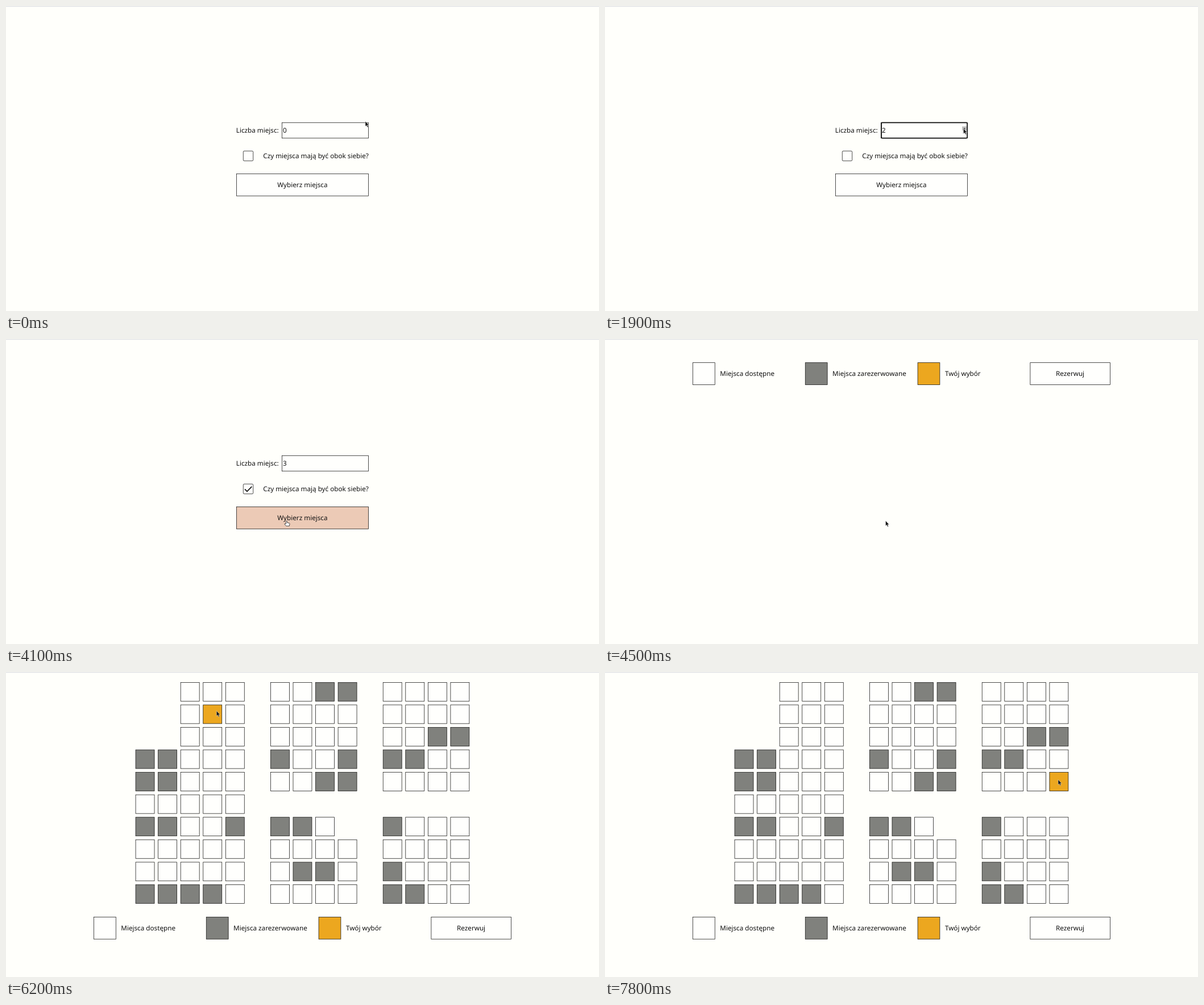
Write an HTML page that moves like this. It is 1043 px wide and 537 px high and loops after 8000 ms.

```html
<!DOCTYPE html>
<html lang="pl">
<head>
<meta charset="utf-8">
<title>Wybór miejsc</title>
<style>
  html, body { margin: 0; width: 100%; height: 100%; overflow: hidden; background: #fffffb; }
  svg { display: block; width: 100vw; height: 100vh; }
  text { font: 11.7px "Noto Sans", "Open Sans", sans-serif; fill: #111; text-rendering: geometricPrecision; }
  .mid { text-anchor: middle; }
  .box { fill: #fffffd; stroke: #111; stroke-width: .75; }
  .popup text { font: 6.5px Roboto, Inter, sans-serif; fill: #666; }
  .popup .brand { font-weight: 500; fill: #555; }
</style>
</head>
<body>
<svg viewBox="0 0 1043 537" xmlns="http://www.w3.org/2000/svg">
  <defs>
    <filter id="shadow" x="-10%" y="-30%" width="120%" height="160%">
      <feDropShadow dx="0" dy="1" stdDeviation="1.4" flood-opacity=".4"/>
    </filter>
  </defs>
  <rect width="1043" height="537" fill="#fffffb"/>
  <rect width="1043" height="1.3" fill="#e1e2e4"/>

  <g id="popup" class="popup">
    <rect x="791" y="-20" width="191" height="53.5" rx="2" fill="#fff" filter="url(#shadow)"/>
    <path d="M791 7H982V31.5a2 2 0 0 1-2 2H793a2 2 0 0 1-2-2Z" fill="#f5f7f7"/>
    <path d="M791 7.5H982" stroke="#e6e8e8"/>
    <path d="M852 1.5H898" stroke="#e4e4e4"/>
    <path d="M800 1.2H852" stroke="#4a5fb8" stroke-width="1.5"/>
    <text class="brand" x="800" y="22.6">Vumelo</text>
    <text x="824.3" y="22.6">Translate</text>
  </g>

  <g id="form">
    <text x="404.8" y="222.7">Liczba miejsc:</text>
    <rect id="field" class="box" x="485.5" y="205.3" width="152.1" height="27.4"/>
    <rect id="focus" x="486.1" y="205.4" width="151" height="27.2" rx="1.5" fill="none" stroke="#111" stroke-width="1.7"/>
    <text id="count" x="487" y="222.7"></text>
    <g id="spinner">
      <rect x="628" y="212" width="8" height="13" fill="#efefef"/>
      <rect id="spinUp" x="628" y="212" width="8" height="7" fill="#c1c1c1"/>
      <path d="M629.8 216.8L632 214.3L634.2 216.8ZM629.8 220.3L632 222.8L634.2 220.3Z" fill="#444"/>
    </g>
    <rect class="box" x="417.3" y="255.3" width="17.4" height="17.4" rx="1.8"/>
    <path id="check" d="M420 264.3L424 268.3L432.3 259.8" fill="none" stroke="#111" stroke-width="1.7"/>
    <text x="452.3" y="268">Czy miejsca mają być obok siebie?</text>
    <rect id="submit" class="box" x="405.4" y="295.4" width="232.2" height="38.9"/>
    <text class="mid" x="521.4" y="318.7">Wybierz miejsca</text>
  </g>

  <g id="seats"></g>
  <g id="legend"></g>

  <g id="cursor">
    <path id="arrow" d="M0 0V9L2 7.2L3.5 10.5L5 9.8L3.6 6.7H6.3Z" fill="#111" stroke="#eee" stroke-width=".5"/>
    <path id="beam" d="M-1.8 -4.8H1.8M0 -4.8V4.8M-1.8 4.8H1.8" fill="none" stroke="#222"/>
    <path id="hand" d="M-1 5.6V.9Q0 -.4 1 .9V3.4L4.8 4.2Q5.6 4.5 5.5 5.6L4.8 9.2H-.8L-3.6 6Q-3.6 4.6 -2.4 5Z" fill="#fff" stroke="#222" stroke-width=".8"/>
  </g>
</svg>
<script>
const LOOP = 8000, STEP = 100;
const FREE = '#fffffd', TAKEN = '#80817d', CHOSEN = '#eca71f';
const GRID = { x: 227.7, y: 18, pitch: 39.56, size: 33.7 };
const INSET = 0.37; // half a border
const BLUR = 3200, CHECK = 3400, SUBMIT = 4500, LOADED = 4900;
const UP_CLICKS = [1200, 1800, 2300];

const PLAN = [
  '..ooo.ooxx.oooo',
  '..ooo.oooo.oooo',
  '..ooo.oooo.ooxx',
  'xxooo.xoox.xxoo',
  'xxooo.ooxx.oooo',
  'ooooo..........',
  'xxoox.xxo..xooo',
  'ooooo.oooo.oooo',
  'ooooo.oxxo.xooo',
  'xxxxo.oooo.xxoo'
];

// the pointer rests between moves
const START = { x: 632, y: 203 };
const MOVES = [
  { from: 0, to: 100, x: 632, y: 206 },
  { from: 200, to: 400, x: 621, y: 215 },
  { from: 500, to: 900, x: 630.5, y: 215.8 },
  { from: 2300, to: 2800, x: 485, y: 279 },
  { from: 2800, to: 3100, x: 429.5, y: 264 },
  { from: 3600, to: 4100, x: 493.5, y: 320 },
  { from: 5100, to: 5400, x: 397, y: 134.5 },
  { from: 5500, to: 5700, x: 366, y: 53 },
  { from: 6000, to: 6200, x: 370.3, y: 68.5 },
  { from: 6200, to: 6800, x: 518, y: 120 },
  { from: 7300, to: 7600, x: 783, y: 190 },
  { from: 7700, to: 7800, x: 797, y: 189.5 }
];

const $ = id => document.getElementById(id);
const show = (id, on) => $(id).setAttribute('visibility', on ? 'inherit' : 'hidden');
const within = (p, x, y, w, h) => p.x >= x && p.x < x + w && p.y >= y && p.y < y + h;
const over = (p, id) => {
  const b = $(id).getBBox();
  return within(p, b.x, b.y, b.width, b.height);
};

function add(parent, tag, attrs, content = '') {
  const el = document.createElementNS('http://www.w3.org/2000/svg', tag);
  Object.entries(attrs).forEach(([k, v]) => el.setAttribute(k, v));
  el.textContent = content;
  $(parent).append(el);
  return el;
}

const addBox = (parent, x, y, w, h, fill) => add(parent, 'rect', {
  class: 'box', x: x + INSET, y: y + INSET,
  width: w - 2 * INSET, height: h - 2 * INSET, style: `fill:${fill}`
});

const seats = PLAN.flatMap((line, row) => [...line].flatMap((mark, col) => {
  if (mark === '.') return [];
  const x = GRID.x + GRID.pitch * col, y = GRID.y + GRID.pitch * row;
  const base = mark === 'x' ? TAKEN : FREE;
  return [{ row, col, x, y, base, el: addBox('seats', x, y, GRID.size, GRID.size, base) }];
}));

const planHeight = GRID.pitch * (PLAN.length - 1) + GRID.size;
const legendX = i => 154.1 + GRID.pitch * 5 * i;
const legendY = GRID.y + planHeight + 23.3;
[['Miejsca dostępne', FREE], ['Miejsca zarezerwowane', TAKEN], ['Twój wybór', CHOSEN]]
  .forEach(([label, fill], i) => {
    addBox('legend', legendX(i), legendY, GRID.pitch, GRID.pitch, fill);
    add('legend', 'text', { x: legendX(i) + 48.2, y: legendY + 24 }, label);
  });
addBox('legend', legendX(3), legendY, 141.3, GRID.pitch, FREE);
add('legend', 'text', { class: 'mid', x: legendX(3) + 70.6, y: legendY + 24 }, 'Rezerwuj');

function pointerAt(t) {
  return MOVES.reduce((p, m) => {
    const k = Math.min(1, Math.max(0, (t - m.from) / (m.to - m.from)));
    return { x: p.x + (m.x - p.x) * k, y: p.y + (m.y - p.y) * k };
  }, START);
}

function renderForm(t, p) {
  const onField = over(p, 'field');
  const onSpinner = within(p, 628, 212, 9, 13);
  const onSubmit = over(p, 'submit');
  const focused = t >= UP_CLICKS[0] && t < BLUR;
  show('focus', focused);
  show('spinner', onField || focused);
  show('spinUp', onSpinner && p.y < 219);
  show('check', t >= CHECK);
  $('count').textContent = UP_CLICKS.filter(click => click <= t).length;
  $('submit').style.fill = onSubmit ? '#eccab6' : FREE;
  if (onSubmit || within(p, 417, 255, 18, 18)) return 'hand';
  return onField && !onSpinner ? 'beam' : 'arrow';
}

function renderPlan(t, p) {
  const loaded = t >= LOADED;
  show('seats', loaded);
  $('legend').setAttribute('transform', `translate(0 ${loaded ? 0 : -planHeight})`);
  const hovered = seats.find(s => within(p, s.x, s.y, GRID.size, GRID.size));
  const reach = t >= 7000 && t < 7400 ? 1 : 0; // neighbours join the choice
  for (const s of seats) {
    const chosen = hovered && s.base === FREE && s.row === hovered.row
      && Math.abs(s.col - hovered.col) <= reach;
    s.el.style.fill = chosen ? CHOSEN : s.base;
  }
  return 'arrow';
}

function render(t) {
  const p = pointerAt(t);
  const onForm = t < SUBMIT;
  for (const id of ['form', 'seats', 'legend']) show(id, onForm === (id === 'form'));
  for (const id of ['focus', 'spinner', 'spinUp', 'check']) show(id, false);
  const kind = onForm ? renderForm(t, p) : renderPlan(t, p);
  for (const id of ['arrow', 'beam', 'hand']) show(id, id === kind);
  $('cursor').setAttribute('transform', `translate(${p.x} ${p.y})`);
  const fade = (t - 1000) / 300;
  $('popup').setAttribute('opacity', Math.min(1, Math.max(0, 1 - fade * fade)));
}

const origin = performance.now();
function tick() {
  const t = (performance.now() - origin) % LOOP;
  render(t < 1000 ? Math.floor(t / STEP) * STEP : Math.floor(t / STEP) * STEP);
  requestAnimationFrame(tick);
}
tick();
</script>
</body>
</html>
```
